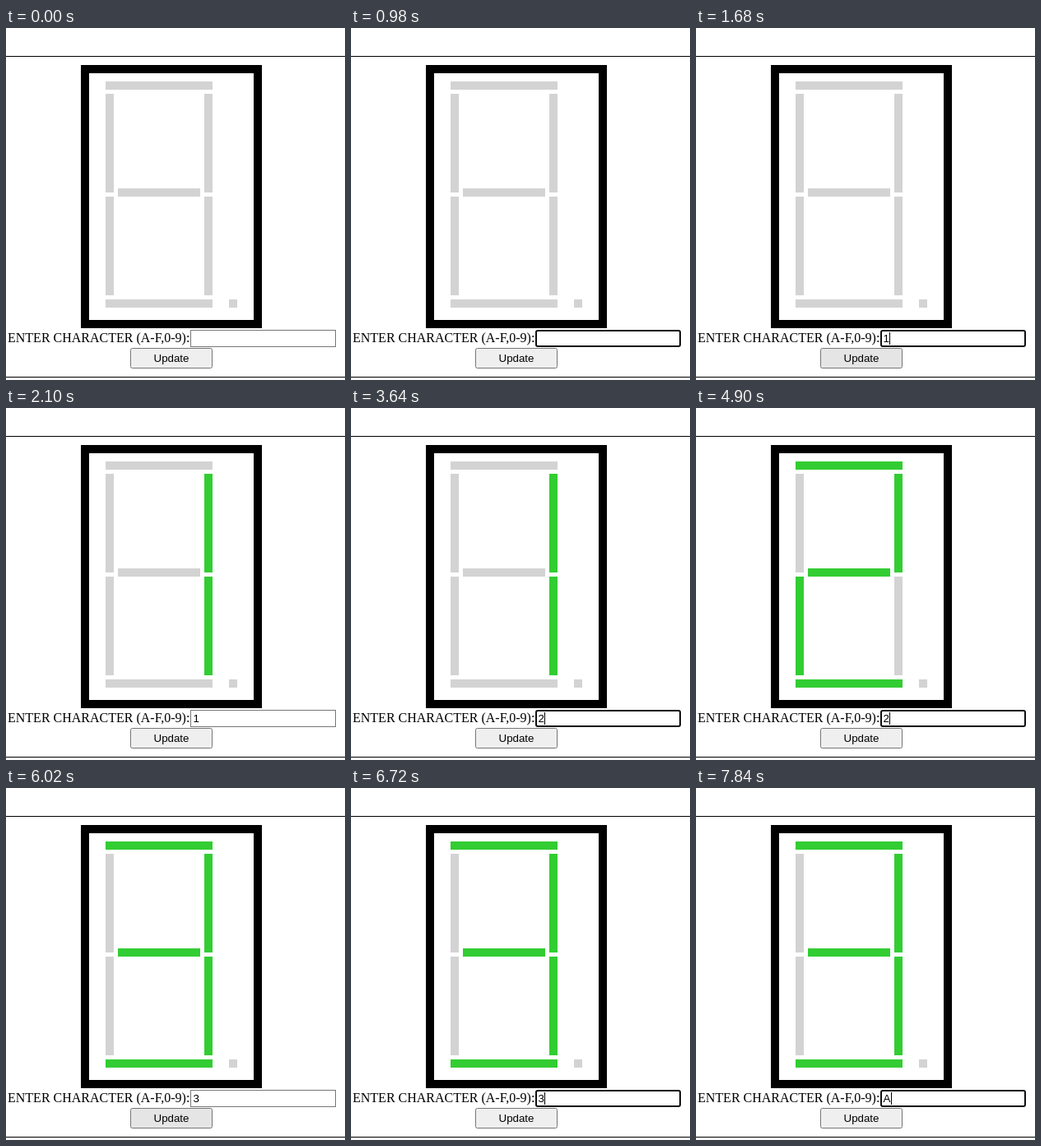
An HTML page for the animation above (8000 ms loop, 412x428 px).

```html
<!DOCTYPE html>
<html lang="en">
<head>
<meta charset="utf-8">
<title>Seven-segment display</title>
<style>
html, body { margin: 0; width: 100%; height: 100%; overflow: hidden; background: #fff; }
svg { display: block; }
text { white-space: pre; }
.label { font: 16px "Liberation Serif", "Times New Roman", serif; }
.ui { font: 13.333px "Liberation Sans", Arial, sans-serif; }
</style>
</head>
<body>
<svg width="412" height="428" viewBox="0 0 412 428">
  <path d="M0 34.5H412M0 424.5H412" stroke="#000"/>
  <rect x="96" y="50" width="210" height="310" fill="none" stroke="#000" stroke-width="10"/>
  <g id="segments"></g>
  <rect x="271" y="330" width="10" height="10" fill="#d3d3d3"/>
  <text class="label" x="2" y="382">ENTER CHARACTER (A-F,0-9):</text>
  <rect id="field" fill="#fff"/>
  <rect id="mark" y="370" height="15"/>
  <text id="value" class="ui" x="227.5" y="382"></text>
  <rect id="button" x="151.5" y="389.5" width="99" height="24" rx="2" stroke="#767676"/>
  <text class="ui" x="201" y="406" text-anchor="middle">Update</text>
</svg>
<script>
const LOOP = 8000, TEXT_X = 227.5;
const $ = id => document.getElementById(id);
const set = (el, attrs) => {
  for (const k in attrs) el.setAttribute(k, attrs[k]);
};

// Segments a to g: x, y, width, height
const bars = [
  [121, 65, 130, 10], [241, 80, 10, 120], [241, 205, 10, 120], [121, 330, 130, 10],
  [121, 205, 10, 120], [121, 80, 10, 120], [136, 195, 100, 10]
].map(([x, y, width, height]) => {
  const bar = document.createElementNS("http://www.w3.org/2000/svg", "rect");
  set(bar, { x, y, width, height });
  return $("segments").appendChild(bar);
});
const lit = { "": "", 1: "bc", 2: "abged", 3: "abgcd" };
const buttonFill = { idle: "#efefef", hover: "#e5e5e5", down: "#f5f5f5" };

// time, digit on display, typed text, field state, button state
const steps = [
  [0, "", "", "blur", "idle"],
  [420, "", "", "caret", "idle"],
  [980, "", "", "focus", "idle"],
  [1400, "", "1", "caret", "idle"],
  [1680, "", "1", "caret", "hover"],
  [1960, "1", "1", "blur", "hover"],
  [2100, "1", "1", "blur", "idle"],
  [2520, "1", "1", "caret", "idle"],
  [2660, "1", "1", "select", "idle"],
  [3640, "1", "2", "caret", "idle"],
  [3780, "1", "2", "caret", "hover"],
  [4060, "1", "2", "blur", "down"],
  [4200, "2", "2", "blur", "hover"],
  [4340, "2", "2", "blur", "idle"],
  [4900, "2", "2", "caret", "idle"],
  [5040, "2", "2", "select", "idle"],
  [5600, "2", "3", "caret", "idle"],
  [5740, "2", "3", "caret", "hover"],
  [6020, "3", "3", "blur", "hover"],
  [6300, "3", "3", "blur", "idle"],
  [6720, "3", "3", "caret", "idle"],
  [6860, "3", "3", "select", "idle"],
  [7840, "3", "A", "caret", "idle"]
];

function draw(time) {
  const [, digit, typed, field, button] = steps.findLast(s => s[0] <= time);
  bars.forEach((bar, i) =>
    set(bar, { fill: lit[digit].includes("abcdefg"[i]) ? "#32cd32" : "#d3d3d3" }));

  const line = field === "blur" ? 1 : 2;
  set($("field"), {
    x: 224 + line / 2, y: 367 + line / 2, width: 177 - line, height: 21 - line,
    rx: line === 1 ? 0 : 2, stroke: line === 1 ? "#767676" : "#101010", "stroke-width": line
  });

  const selected = field === "select";
  $("value").textContent = typed;
  set($("value"), { fill: selected ? "#fff" : "#000" });
  const width = typed ? $("value").getComputedTextLength() : 0;
  set($("mark"), {
    x: selected ? 227 : Math.ceil(TEXT_X + width),
    width: selected ? Math.ceil(width) : field === "caret" ? 1 : 0,
    fill: selected ? "#0078d7" : "#000"
  });
  set($("button"), { fill: buttonFill[button] });
}

const start = performance.now();
function tick() {
  draw((performance.now() - start) % LOOP);
  requestAnimationFrame(tick);
}
tick();
</script>
</body>
</html>
```
